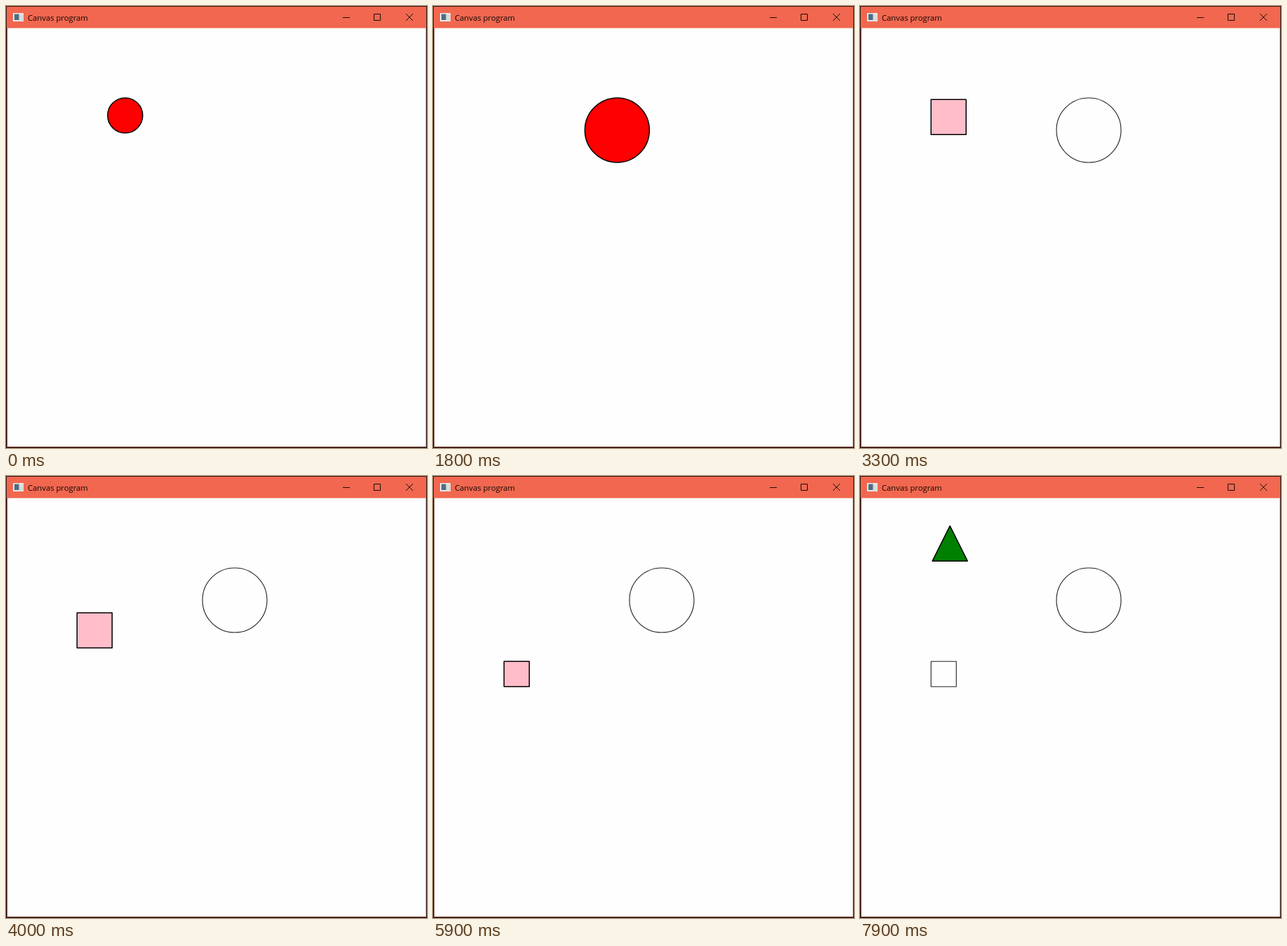
Animation of 600x630 px, one loop 8000 ms. Source, as an HTML page:

```html
<!DOCTYPE html>
<html lang="en">
<head>
<meta charset="utf-8">
<title>Canvas program</title>
<style>
  html, body { margin: 0; width: 100%; height: 100%; overflow: hidden; background: #fefefe; }
  svg { display: block; width: 600px; height: 630px; }
  text { font: 11.25px "Open Sans", "Noto Sans", sans-serif; fill: #120805; }
  .icon { fill: none; stroke: #1c0c08; }
  .shape { stroke: #000; stroke-width: 1.5; stroke-linejoin: round; }
  .shape.plain { fill: none; stroke: #202028; stroke-width: 1.1; }
</style>
</head>
<body>
<svg viewBox="0 0 600 630">
  <rect width="600" height="630" fill="#2a1410"/>
  <rect x="1" y="1" width="598" height="628" fill="#7c4034"/>
  <rect x="2" y="31" width="596.5" height="597" fill="#fefefe"/>
  <rect x="1" y="1" width="598" height="30.5" fill="#f1674f"/>
  <g>
    <rect x="10" y="10" width="15" height="12" fill="#e6eaea"/>
    <rect x="12" y="11.5" width="6.5" height="8.5" fill="#4d6d80"/>
    <path d="M20 12v9M23 12v9" stroke="#b9c4c6"/>
  </g>
  <text x="31" y="21">Canvas program</text>
  <path class="icon" d="M480 16.5h10M524.5 11.5h9v9h-9zM570 11l10 10M580 11l-10 10"/>
  <circle id="circle" class="shape" fill="#f00"/>
  <rect id="square" class="shape" x="101.25" fill="#ffbdc9"/>
  <path id="triangle" class="shape" fill="#008000" d="M25 0L50 50H0Z"/>
</svg>
<script>
  const LOOP = 8000, STEP = 100;
  const DELAY = 200, RATE = 0.095, NUDGE = 2;
  const LEFT = 101.2, TOP = 131.2, SIZE = 50;
  const SQUARE_ON = 2950, TRIANGLE_ON = 6450;

  const [circle, square, triangle] = ["circle", "square", "triangle"].map(id => document.getElementById(id));

  // A held key: one nudge at once, a short wait, then steady repeats up to the total.
  function held(t, press, total) {
    if (t < press) return 0;
    return Math.min(total, NUDGE + Math.max(0, t - press - DELAY) * RATE);
  }

  function set(el, attrs) {
    for (const k in attrs) el.setAttribute(k, attrs[k]);
  }

  function show(el, on) {
    el.style.display = on ? "" : "none";
  }

  function draw(t) {
    const r = (SIZE + held(t, 1050, 42)) / 2;
    const left = 144.8 + Math.min(71.6, t * RATE) + held(t, 1900, 63.6);
    const side = SIZE - held(t, 5100, 14);
    const x = LEFT + held(t, 7850, NUDGE), y = TOP - held(t, 6790, 60);

    set(circle, { cx: left + r, cy: 131 + r, r });
    set(square, { y: TOP + held(t, 3150, 133), width: side, height: side });
    set(triangle, { transform: `translate(${x} ${y})` });
    circle.classList.toggle("plain", t >= SQUARE_ON);
    square.classList.toggle("plain", t >= TRIANGLE_ON);
    show(square, t >= SQUARE_ON);
    show(triangle, t >= TRIANGLE_ON);
  }

  const start = performance.now();
  function tick() {
    const t = (performance.now() - start) % LOOP;
    draw(Math.floor(t / STEP) * STEP);
    requestAnimationFrame(tick);
  }
  tick();
</script>
</body>
</html>
```
